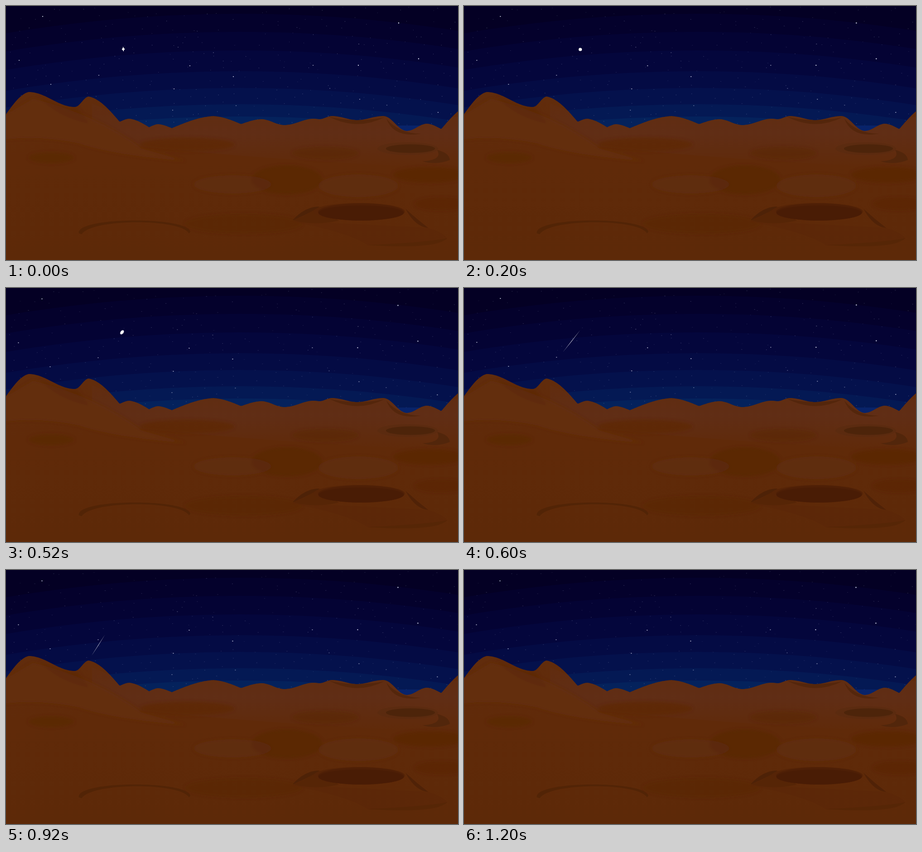
An HTML page that plays this animation: 998 by 561 pixels, repeating every 1.4 s.

```html
<!DOCTYPE html>
<html lang="en">
<head>
<meta charset="utf-8">
<title>Night over a red desert</title>
<style>
  html, body { margin: 0; width: 100%; height: 100%; overflow: hidden; background: #5e2a08; }
  svg { display: block; width: 100%; height: 100%; }
  #stars { animation: drift 1.4s step-end infinite; }
  @keyframes drift {
    0% { transform: none; }
    14.2857%, 42.8571%, 71.4286% { transform: translate(-.7px, 0); }
    28.5714%, 57.1429%, 85.7143% { transform: translate(-1.6px, .9px); }
  }
  /* each pose of the falling star shows for one 200 ms step */
  .pose { visibility: hidden; animation: show 1.4s step-end infinite; animation-delay: calc((var(--i) - 7) * .2s); }
  @keyframes show {
    0% { visibility: visible; }
    14.2857%, 100% { visibility: hidden; }
  }
</style>
</head>
<body>
<svg viewBox="0 0 998 561" preserveAspectRatio="none">
  <defs>
    <clipPath id="land"><path id="ridge"/></clipPath>
    <linearGradient id="soil" x2="0" y2="1">
      <stop offset="0" stop-color="#612c0c"/>
      <stop offset=".4" stop-color="#602a09"/>
      <stop offset="1" stop-color="#5d2908"/>
    </linearGradient>
    <linearGradient id="haze" x2="0" y2="1">
      <stop offset="0" stop-color="#602e18" stop-opacity=".3"/>
      <stop offset=".45" stop-color="#602e18" stop-opacity=".8"/>
      <stop offset="1" stop-color="#602e18" stop-opacity="0"/>
    </linearGradient>
    <filter id="soft" x="-10%" y="-30%" width="120%" height="160%"><feGaussianBlur stdDeviation="3"/></filter>
  </defs>

  <rect width="998" height="561" fill="rgb(4,0,36)"/>
  <g id="sky"></g>
  <path d="M850 264H915V280H850Z" fill="#08236a"/>
  <g id="stars"></g>

  <g fill="#fff">
    <path class="pose" style="--i:0" d="M258.500 89Q259.500 94 263 95Q260 96.500 259.500 101Q258 97 255.500 95.500Q258.500 93 258.500 89Z"/>
    <circle class="pose" style="--i:1" cx="256.800" cy="96" r="3.600"/>
    <ellipse class="pose" style="--i:2" cx="256.300" cy="97.700" rx="3.300" ry="5.200" transform="rotate(38 256.300 97.700)"/>
    <path class="pose" style="--i:3" opacity=".75" d="M257 92.500L238.200 117.400L218.500 141.500L237.400 116.800Z"/>
    <path class="pose" style="--i:4" opacity=".75" d="M218.700 142.500L204.200 166.600L188.800 189.500L203.400 166Z"/>
  </g>

  <use href="#ridge" fill="url(#soil)"/>
  <g clip-path="url(#land)">
    <path d="M190 215L260 245H998V360Q560 340 190 300Z" fill="url(#haze)"/>
    <g filter="url(#soft)" fill="#5a2708">
      <path d="M0 240L60 205Q200 240 300 315L395 342Q240 330 160 303Q80 286 0 294Z" fill="#642f0e"/>
      <path d="M72 199Q120 226 158 225Q170 240 184 260Q110 245 72 199Z" opacity=".6"/>
      <ellipse cx="400" cy="306" rx="104" ry="15" fill="#5e2a0b" opacity=".6"/>
      <ellipse cx="705" cy="325" rx="73" ry="14" opacity=".4"/>
      <ellipse cx="500" cy="394" rx="85" ry="20" fill="#602d13" opacity=".7"/>
      <ellipse cx="778" cy="397" rx="88" ry="25" fill="#602d13" opacity=".7"/>
      <ellipse cx="100" cy="335" rx="50" ry="12" opacity=".7"/>
      <ellipse cx="620" cy="384" rx="78" ry="32" opacity=".75"/>
      <ellipse cx="935" cy="373" rx="80" ry="17" opacity=".8"/>
      <ellipse cx="960" cy="437" rx="57" ry="14" opacity=".5"/>
      <ellipse cx="525" cy="481" rx="130" ry="22" opacity=".4"/>
    </g>

    <!-- shadow below the ridges -->
    <g fill="#52250a" opacity=".8">
      <path d="M714 245Q775 258 835 246Q775 276 714 245Z"/>
      <path d="M840 249Q868 282 916 282Q856 292 840 249Z"/>
    </g>

    <!-- small crater -->
    <ellipse cx="887" cy="315" rx="67" ry="14" fill="#592a10" opacity=".6"/>
    <ellipse cx="893" cy="315" rx="54" ry="9.500" fill="#4d240a"/>
    <path d="M952 318Q978 324 980 340Q950 352 920 343Q965 340 952 318Z" fill="#52260b"/>

    <!-- large crater -->
    <path d="M628 475L930 490Q965 500 974 514Q940 530 800 529Q760 500 628 475Z" fill="#5a2708" opacity=".5"/>
    <path d="M800 528Q930 522 974 513Q950 538 800 528Z" fill="#552507" opacity=".7"/>
    <path d="M633 473Q660 466 690 443L735 474Q680 486 633 473Z" fill="#562506"/>
    <path d="M633 473Q660 443 692 443Q664 462 633 473Z" fill="#4e2207"/>
    <ellipse cx="780" cy="454" rx="101" ry="19" fill="#562407"/>
    <ellipse cx="784" cy="455" rx="95" ry="19" fill="#4e1f06"/>
    <ellipse cx="784" cy="457" rx="94" ry="16.500" fill="#491c05"/>
    <path d="M882 448Q906 470 932 490Q904 488 882 448Z" fill="#502207"/>

    <!-- shallow rim -->
    <path d="M161 502C155 465 404 465 407 499L404 502C385 469 190 469 167 504Z" fill="#522406"/>
  </g>
</svg>
<script>
const NS = 'http://www.w3.org/2000/svg';
const $ = id => document.getElementById(id);
const circle = (id, cx, cy, r, fill) => {
  const el = document.createElementNS(NS, 'circle');
  Object.entries({ cx, cy, r, fill }).forEach(([k, v]) => el.setAttribute(k, v));
  $(id).append(el);
};

// concentric sky bands, lighter towards the horizon
[17, 57, 98, 144, 181, 217, 244].forEach((top, i) => {
  const k = (i + 1) / 7;
  circle('sky', 515, top + 3096, 3096, `rgb(4,${34 * k * k},${36 + 56 * k})`);
});

// hill tops and dips; a sharp dip (third value 1) leaves at an angle
const turns = [[0, 239, 1], [50, 190], [152, 223], [183, 200], [251, 256, 1], [272, 249],
  [316, 268, 1], [336, 261], [366, 270, 1], [458, 243], [519, 261, 1], [563, 250], [615, 263],
  [680, 249], [692, 250], [720, 243], [775, 252], [833, 243], [885, 276], [930, 260],
  [961, 272, 1], [1030, 215]];
const round = t => (1 - Math.cos(Math.PI * t)) / 2;
const leave = t => .75 * Math.sin(Math.PI * t / 2) + .25 * t;
const ridgeY = x => {
  const i = turns.findIndex(p => p[0] > x);
  const [a, b] = [turns[i - 1], turns[i]];
  const t = (x - a[0]) / (b[0] - a[0]);
  const k = a[2] ? leave(t) : b[2] ? 1 - leave(1 - t) : round(t);
  return a[1] + (b[1] - a[1]) * k;
};
let outline = 'M0 561';
for (let x = 0; x <= 998; x += 2) outline += `L${x} ${ridgeY(x).toFixed(1)}`;
$('ridge').setAttribute('d', outline + 'V561Z');

let seed = 41;
const rand = () => (seed = seed * 16807 % 2147483647) / 2147483647;

// faint stars, one in most cells of a loose grid
for (let y = 2; y < 265; y += 19) {
  for (let x = 2; x < 998; x += 38) {
    const sx = x + rand() * 34, sy = y + rand() * 16, glow = .2 + rand() * .3;
    if (rand() < .8) circle('stars', sx, sy, .6, `rgba(200,205,235,${glow})`);
  }
}

// main stars, brightest first
const main = [[867, 37.5], [911, 116.5], [778, 131], [81, 23], [502, 156], [406, 132], [29, 120],
  [371, 183], [99, 173], [954, 235], [205, 153], [678, 131], [781, 206], [368, 230], [508, 220],
  [841, 219], [715, 182], [779, 84], [458, 103], [380, 91]];
main.forEach(([x, y], i) => circle('stars', x, y, 1.2 - i * .025, `rgba(235,238,255,${.95 - i * .02})`));
</script>
</body>
</html>
```
